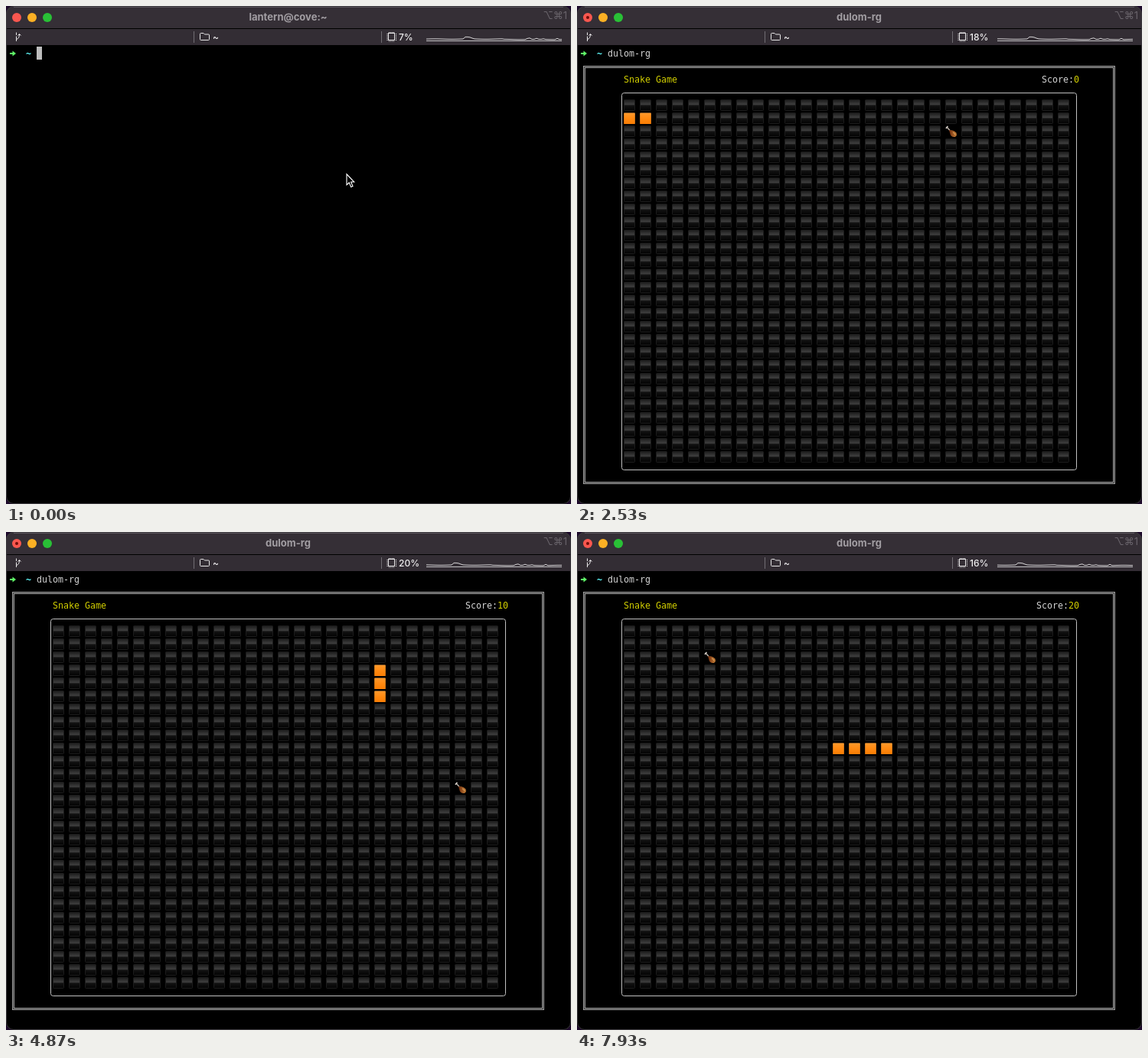
An HTML page that plays this animation: 738 by 650 pixels, repeating every 8000 ms.

```html
<!DOCTYPE html>
<html lang="en">
<head>
<meta charset="utf-8">
<title>Terminal snake</title>
<style>
  html, body { margin: 0; width: 100%; height: 100%; overflow: hidden; background: #1d0a2b; }
  svg { display: block; width: 738px; height: 650px; }
  text { white-space: pre; }
  .ui { font: 500 12px Inter, sans-serif; fill: #f0eff0; }
  .title { font: 700 13px Inter, sans-serif; fill: #a29ea3; text-anchor: middle; }
  .keys { font: 400 13px Inter, "DejaVu Sans", sans-serif; fill: #6a656c; text-anchor: end; }
  .mono { font: 11.63px "DejaVu Sans Mono", monospace; fill: #d4d4d4; }
  .yellow { fill: #d2cf00; }
  .line { fill: none; stroke: #e8e7e8; }
</style>
</head>
<body>
<svg viewBox="0 0 738 650">
  <defs>
    <linearGradient id="dark" x2="0" y2="1">
      <stop offset="0" stop-color="#1c1c1c"/>
      <stop offset=".2" stop-color="#2c2c2c"/>
      <stop offset=".42" stop-color="#3e3e3e"/>
      <stop offset=".54" stop-color="#121212"/>
      <stop offset="1" stop-color="#030303"/>
    </linearGradient>
    <linearGradient id="orange" x2="0" y2="1">
      <stop offset="0" stop-color="#ff9a2c"/>
      <stop offset=".5" stop-color="#ff8a12"/>
      <stop offset="1" stop-color="#f97d04"/>
    </linearGradient>
    <linearGradient id="meat" x2="1" y2="0">
      <stop offset="0" stop-color="#6d2a0c"/>
      <stop offset="1" stop-color="#c98238"/>
    </linearGradient>
    <pattern id="cells" x="58" y="121" width="21" height="17" patternUnits="userSpaceOnUse">
      <rect x="3.5" y="1.5" width="14" height="14" rx="1" fill="url(#dark)" stroke="#1c1c1c"/>
    </pattern>
    <clipPath id="shape"><rect width="738" height="650" rx="10"/></clipPath>
  </defs>

  <rect width="738" height="650" fill="#1d0a2b"/>
  <g clip-path="url(#shape)">
    <rect width="738" height="650"/>
    <rect width="738" height="29" fill="#352f36"/>
    <rect y="30" width="738" height="21" fill="#332d34"/>
  </g>
  <rect x=".5" y=".5" width="737" height="649" rx="9.5" fill="none" stroke="#3c393e"/>
  <path d="M10 1.5H728" stroke="#5d585f"/>

  <circle cx="14" cy="15" r="6" fill="#f9574f"/>
  <circle cx="34" cy="15" r="6" fill="#fbb024"/>
  <circle cx="54" cy="15" r="6" fill="#29c036"/>
  <circle id="dot" cx="14" cy="15" r="2" fill="#6f0d09"/>
  <text id="title" class="title" x="368.5" y="19"></text>
  <text class="keys" x="733" y="17">⌥⌘1</text>

  <path d="M245.5 33V48M490.5 33V48" stroke="#716d73"/>
  <path class="line" d="M13.5 34.5V38M13.5 39.5V46M13.5 43.5Q17.5 42.5 17.5 37M15.5 38.5L17.5 36.5L19.5 38.5"/>
  <path class="line" d="M253.5 43.5V36.5Q253.5 35.5 254.5 35.5H258L259.5 37H264.5Q265.5 37 265.5 38V43.5Q265.5 44.5 264.5 44.5H254.5Q253.5 44.5 253.5 43.5Z"/>
  <text class="ui" x="270" y="45">~</text>
  <rect class="line" x="499.5" y="35.5" width="8" height="9"/>
  <path class="line" stroke-dasharray="1 1" d="M500 34.5H508M500 46H508M498 36V45M509.5 36V45"/>
  <text id="cpu" class="ui" x="513" y="45"></text>
  <path d="M549 45.5H726" stroke="#c4c2c5"/>
  <polyline id="graph" class="line" stroke-width=".9"/>

  <path d="M5 62H10" stroke="#5ff967" stroke-width="2"/>
  <path d="M8.5 58.5L13 62L8.5 65.5Z" fill="#5ff967"/>
  <text class="mono" x="26" y="66" style="fill:#5ffdff;font-weight:700">~</text>
  <text id="typed" class="mono" x="40" y="66"></text>
  <rect id="caret" width="7" height="17" fill="#bdbdbd"/>

  <g id="game">
    <g fill="none" stroke="#9c9c9c">
      <rect x="9.5" y="79.5" width="692" height="543" stroke="#3c3c3c"/>
      <rect x="8.5" y="78.5" width="694" height="545"/>
      <rect x="10.5" y="80.5" width="690" height="541"/>
    </g>
    <rect x="58.5" y="113.5" width="594" height="492" rx="3" fill="none" stroke="#c0c0c0"/>
    <text class="mono yellow" x="61" y="100">Snake Game</text>
    <text class="mono" x="656" y="100" text-anchor="end">Score:<tspan id="score" class="yellow"></tspan></text>
    <rect x="58" y="121" width="588" height="476" fill="url(#cells)"/>
    <g id="food">
      <rect x="-1" y="-1" width="17" height="17"/>
      <path d="M2.5 2.500L7 7.5" stroke="#b9aea4" stroke-width="1.5"/>
      <path d="M1.3 3.2L3 1.3" stroke="#dcd6d0" stroke-width="1.6" stroke-linecap="round"/>
      <path d="M5 6Q11 5.300 14.300 9.500Q16 13.500 12.700 15Q8 15.800 6.500 11.300Z" fill="url(#meat)"/>
      <path d="M10 9Q13 10 12.800 12" fill="none" stroke="#dda868"/>
    </g>
    <g id="snake"></g>
  </g>

  <path id="mouse" d="M445 219.5V233.5L448.2 230.5L450.7 236.2L453 235.2L450.6 229.8H454.8Z" stroke="#fff" stroke-width="1.1"/>
</svg>

<script>
  const LOOP = 8000, TICK = LOOP / 120, SIZE = 28;
  const COMMAND = 'dulom-rg', HOST = 'lantern@cove:~';
  const KEYS = [270, 330, 470, 530, 670, 800, 930, 1070];
  const ENTER = 1270, LAUNCH = 1670, GAME = 1730;
  const STEP = 104, STEP_START = 2470;
  const LEGS = [[1, 0, 19], [0, 1, 11], [1, 0, 6], [0, -1, 3], [-1, 0, 20]];
  const MEALS = [20, 35];
  const FOOD = [[20, 2], [25, 12], [5, 2]];
  const CPU = [7, 11, 15, 18, 20, 20, 19, 18, 16];
  const PEAKS = { 17: 4.6, 18: 4.6, 19: 4.2, 20: 3, 21: 2.1, 44: 2.6, 45: 3.2, 48: 2.8, 51: 2.2, 57: 2.7 };

  const $ = id => document.getElementById(id);
  const show = (id, on) => { $(id).style.display = on ? '' : 'none'; };
  const place = (el, [x, y]) => el.setAttribute('transform', `translate(${61 + 21 * x} ${122 + 17 * y})`);

  const segments = Array.from({ length: 4 }, () => {
    const r = document.createElementNS('http://www.w3.org/2000/svg', 'rect');
    const box = { x: 0.2, y: 0.4, width: 14.6, height: 14.6, rx: 0.6, fill: 'url(#orange)' };
    for (const name in box) r.setAttribute(name, box[name]);
    return $('snake').appendChild(r);
  });

  // Cell the head occupies after n moves; earlier moves wrap around the field.
  function headAt(n) {
    let x = 1 + Math.min(n, 0), y = 1;
    for (const [dx, dy, len] of LEGS) {
      const k = Math.max(0, Math.min(n, len));
      x += dx * k;
      y += dy * k;
      n -= len;
    }
    return [(x + SIZE) % SIZE, y];
  }

  function load(j) {
    const wobble = Math.sin(j * 12.9898) * 0.25;
    return PEAKS[j] ?? (j < 34 ? 1.9 : 1.4) + wobble;
  }

  function drawGraph(shift) {
    const pts = Array.from({ length: 60 }, (_, i) => `${549 + i * 3},${(45 - load(i + shift)).toFixed(2)}`);
    $('graph').setAttribute('points', pts.join(' '));
  }

  function drawGame(t) {
    const n = Math.floor((t - STEP_START) / STEP);
    const eaten = MEALS.filter(m => n >= m).length;
    segments.forEach((s, i) => {
      s.style.display = i < 2 + eaten ? '' : 'none';
      place(s, headAt(n - i));
    });
    place($('food'), FOOD[eaten]);
    $('score').textContent = eaten * 10;
  }

  function draw(t) {
    const since = at => t >= at - 5;
    const typed = KEYS.filter(since).length;
    const updates = Math.floor((t - 130) / 1000) + 1;

    $('title').textContent = since(ENTER) ? COMMAND : HOST;
    $('typed').textContent = COMMAND.slice(0, typed);
    $('cpu').textContent = CPU[updates] + '%';
    drawGraph(updates);

    show('mouse', !since(KEYS[0]));
    show('caret', !since(LAUNCH));
    $('caret').setAttribute('x', since(ENTER) ? 5 : 40 + 7 * typed);
    $('caret').setAttribute('y', since(ENTER) ? 70 : 53);
    show('dot', since(GAME));
    show('game', since(GAME));
    if (since(GAME)) drawGame(t);
  }

  let last = -1;
  function frame() {
    const k = Math.floor(((performance.now() % LOOP) + 5) / TICK) % 120;
    if (k !== last) draw(k * TICK);
    last = k;
    requestAnimationFrame(frame);
  }
  frame();
</script>
</body>
</html>
```
